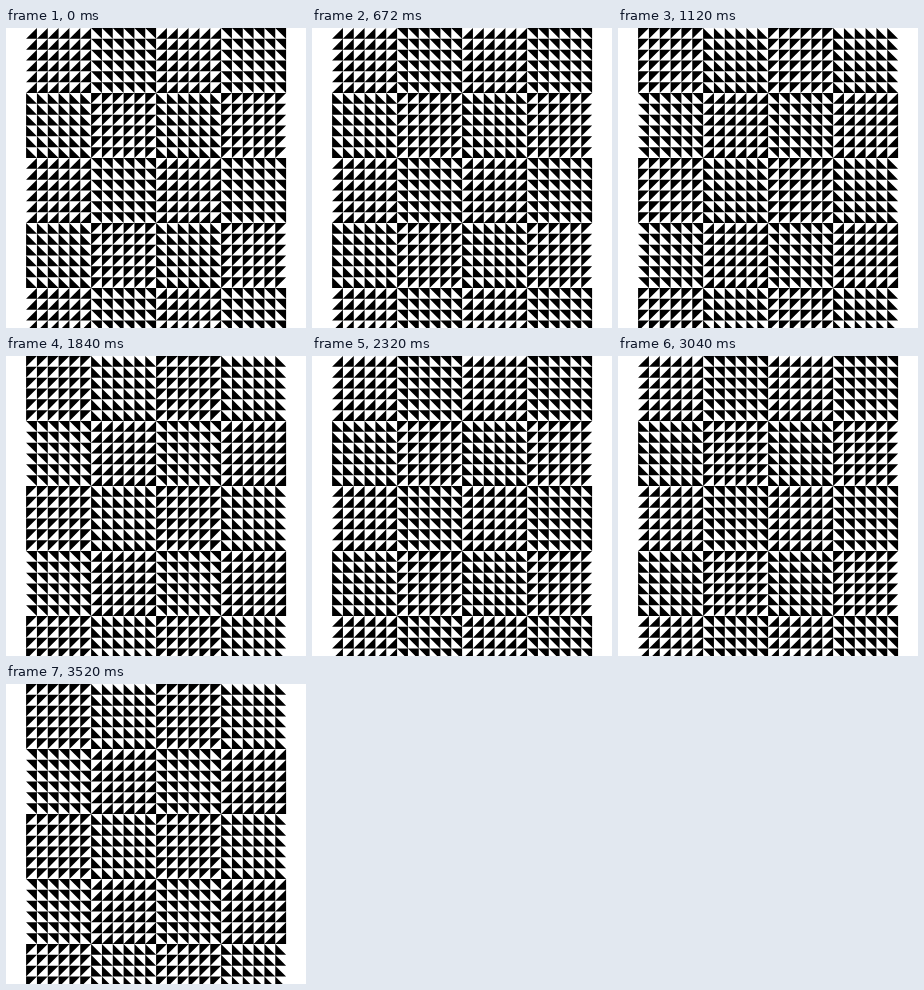
Write an HTML page that moves like this. It is 300 px wide and 300 px high and loops after 3.6 s.

```html
<!DOCTYPE html>
<html lang="en">
<head>
<meta charset="utf-8">
<title>Triangle checkerboard</title>
<style>
  html, body { margin: 0; width: 100%; height: 100%; overflow: hidden; background: #fff; }
  svg { display: block; width: 100vw; height: 100vh; }
</style>
</head>
<body>
<svg viewBox="0 0 300 300"><path id="tiles" fill="#000"/></svg>
<script>
const LOOP = 3600;
const SWITCHES = [1120, 2320, 3520];
const LEFT = 20.1, TOP = 0;
const PER_BLOCK = 6, CELL = 65 / PER_BLOCK;
const COLS = 24, ROWS = 28;

// Diagonals alternate like a checkerboard; the black half swaps in every other block column.
function triangle(col, row, flipped) {
  const x = LEFT + col * CELL, y = TOP + row * CELL;
  const r = x + CELL, b = y + CELL;
  const blockCol = Math.floor(col / PER_BLOCK);
  const blockRow = Math.floor(row / PER_BLOCK);
  const rising = (blockCol + blockRow) % 2 === 0;
  const upper = flipped !== (blockCol % 2 === 1);
  const diagonal = rising ? [x, b, r, y] : [x, y, r, b];
  const corner = [rising === upper ? x : r, upper ? y : b];
  const p = [...diagonal, ...corner].map(n => n.toFixed(2));
  return `M${p[0]} ${p[1]}L${p[2]} ${p[3]}L${p[4]} ${p[5]}Z`;
}

function pattern(flipped) {
  let d = "";
  for (let row = 0; row < ROWS; row++)
    for (let col = 0; col < COLS; col++) d += triangle(col, row, flipped);
  return d;
}

const states = [pattern(false), pattern(true)];
const tiles = document.getElementById("tiles");
let shown = -1;

function draw(time) {
  const t = time % LOOP;
  const state = SWITCHES.filter(s => t >= s).length % 2;
  if (state !== shown) {
    tiles.setAttribute("d", states[state]);
    shown = state;
  }
}

const start = performance.now();
function tick() {
  draw(performance.now() - start);
  requestAnimationFrame(tick);
}
tick();
</script>
</body>
</html>
```
